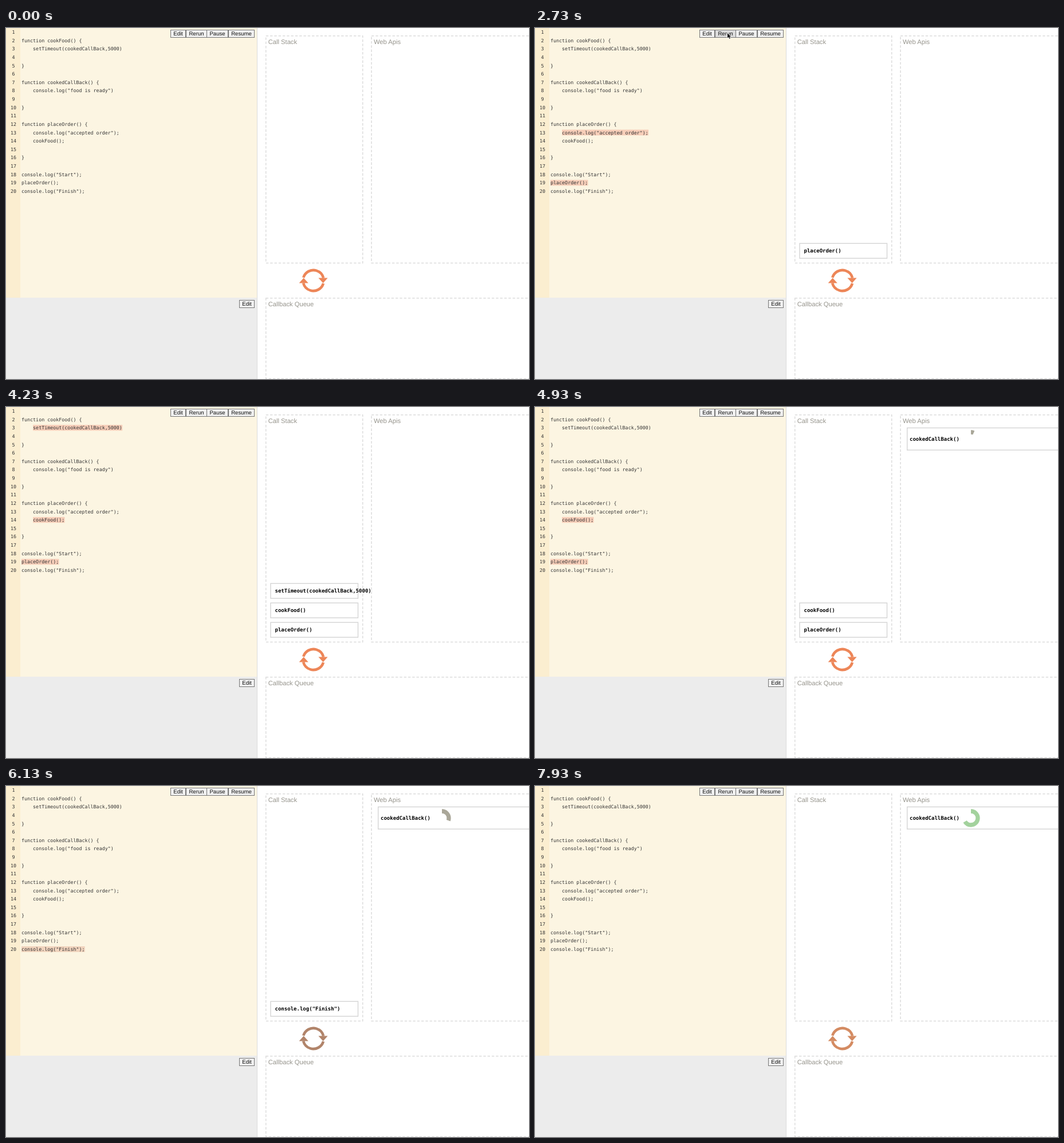
An HTML page with a canvas for the animation above (8000 ms loop, 913 by 613 pixels).

```html
<!DOCTYPE html>
<html lang="en">
<head>
<meta charset="utf-8">
<title>Event loop</title>
<style>
html, body { margin: 0; width: 100%; height: 100%; overflow: hidden; background: #fff; }
canvas { display: block; width: 913px; height: 613px; }
</style>
</head>
<body>
<canvas id="stage"></canvas>
<script>
const W = 913, H = 613, LOOP = 8000, FADE = 100;
const canvas = document.getElementById('stage');
const ctx = canvas.getContext('2d');
const dpr = window.devicePixelRatio || 1;
canvas.width = W * dpr;
canvas.height = H * dpr;

const MONO = '"DejaVu Sans Mono", monospace';
const SANS = '"Liberation Sans", Arial, sans-serif';
const CODE_FONT = `8.36px ${MONO}`;
const ITEM_FONT = `bold 9.03px ${MONO}`;
const CHAR = 5.033, LINE = 14.63;

const code = `
function cookFood() {
    setTimeout(cookedCallBack,5000)

}

function cookedCallBack() {
    console.log("food is ready")

}

function placeOrder() {
    console.log("accepted order");
    cookFood();

}

console.log("Start");
placeOrder();
console.log("Finish");`.split('\n');

// Each call highlights its line and occupies a stack slot
const calls = [
  { text: 'console.log("Start")', line: 18, slot: 0, on: 1830, off: 2330 },
  { text: 'placeOrder()', line: 19, slot: 0, on: 2330, off: 5430 },
  { text: 'console.log("accepted order")', line: 13, slot: 1, on: 2730, off: 3230 },
  { text: 'cookFood()', line: 14, slot: 1, on: 3630, off: 5030 },
  { text: 'setTimeout(cookedCallBack,5000)', line: 3, slot: 2, on: 4130, off: 4530 },
  { text: 'console.log("Finish")', line: 20, slot: 0, on: 5930, off: 6330 }
];
const TIMER = { on: 4530, start: 4600, length: 5000 };

const tones = [
  { from: 0, icon: '#ed8658', mark: '#f6cdb8', ring: '#a9a799' },
  { from: 5430, icon: '#b1846a', mark: '#f0d3bd', ring: '#aaa799' },
  { from: 6330, icon: '#c58764', mark: '#f0d3bd', ring: '#a6bd9b' },
  { from: 7230, icon: '#d48b62', mark: '#f6cdb8', ring: '#a3d29d' }
];

const clamp = v => Math.max(0, Math.min(1, v));
const mix = (a, b, k) => a + (b - a) * k;

function rect(x, y, w, h, color) {
  ctx.fillStyle = color;
  ctx.fillRect(x, y, w, h);
}

function text(str, x, y, font, color, align = 'left') {
  ctx.font = font;
  ctx.fillStyle = color;
  ctx.textAlign = align;
  ctx.fillText(str, x, y);
}

function frame(x, y, w, h, color, width) {
  ctx.strokeStyle = color;
  ctx.lineWidth = width;
  ctx.strokeRect(x, y, w, h);
}

function button(label, x, y, w, fill = '#f0f0f0') {
  rect(x, y, w, 14, fill);
  frame(x + .5, y + .5, w - 1, 13, '#777', 1);
  text(label, x + w / 2, y + 10.4, `9.6px ${SANS}`, '#111', 'center');
}

function panel(label, x, y, w, h) {
  ctx.setLineDash([4.4, 2.9]);
  frame(x, y, w, h, '#dcdcdc', 1.5);
  ctx.setLineDash([]);
  text(label, x + 4, y + 14.6, `11.2px ${SANS}`, '#96948c');
}

function drawEditor(t, tone) {
  rect(0, 0, 438, 471, '#fcf5e2');
  rect(0, 0, 25, 471, '#fbeed0');
  rect(0, 471, 438, 142, '#ececec');
  rect(438, 0, 1, H, '#dcdcdc');
  for (const c of calls) {
    if (t < c.on || t >= c.off) continue;
    const src = code[c.line - 1], body = src.trim();
    const x = 27 + (src.length - body.length) * CHAR;
    rect(x, (c.line - 1) * LINE + 2, body.length * CHAR, 10, tone.mark);
  }
  code.forEach((src, i) => {
    const y = 10 + i * LINE;
    text(i + 1, 13, y, CODE_FONT, '#333', 'center');
    text(src, 27, y, CODE_FONT, '#333');
  });
  const pressed = t >= 1430 && t < 3630;
  button('Edit', 287, 3, 27);
  button('Rerun', 314, 3, 37, pressed ? '#dcdcdc' : undefined);
  button('Pause', 350, 3, 38);
  button('Resume', 388, 3, 46);
  button('Edit', 407, 475, 27);
}

function drawStack(t) {
  for (const c of calls) {
    const alpha = Math.min(clamp((t - c.on) / FADE), clamp(1 - (t - c.off) / FADE));
    if (!alpha) continue;
    const y = 376.2 - c.slot * 34;
    ctx.globalAlpha = alpha;
    frame(462, y, 152.5, 26, '#d4d4d4', 1.4);
    text(c.text, 469.5, y + 16, ITEM_FONT, '#000');
    ctx.globalAlpha = 1;
  }
}

function drawTimer(t, tone) {
  if (t < TIMER.on) return;
  ctx.globalAlpha = clamp((t - TIMER.on) / FADE);
  frame(649.7, 36.5, 300, 38.7, '#d4d4d4', 1.4);
  text('cookedCallBack()', 654, 58.6, ITEM_FONT, '#000');
  const part = clamp((t - TIMER.start) / TIMER.length);
  ctx.beginPath();
  ctx.arc(761, 56, 12, -Math.PI / 2, -Math.PI / 2 + part * Math.PI * 2);
  ctx.strokeStyle = tone.ring;
  ctx.lineWidth = 7.3;
  ctx.stroke();
  ctx.globalAlpha = 1;
}

function drawLoopIcon(color) {
  ctx.save();
  ctx.translate(536.6, 441);
  ctx.strokeStyle = ctx.fillStyle = color;
  ctx.lineWidth = 4.6;
  for (let i = 0; i < 2; i++) {
    ctx.beginPath();
    ctx.arc(0, 0, 18.1, Math.PI * 1.09, Math.PI * 1.92);
    ctx.stroke();
    ctx.beginPath();
    ctx.moveTo(8.8, -4.4);
    ctx.lineTo(25, -4.4);
    ctx.lineTo(17, 4.4);
    ctx.fill();
    ctx.rotate(Math.PI);
  }
  ctx.restore();
}

function drawCursor(t) {
  if (t < 610 || t >= 4230) return;
  const enter = 1 - (1 - clamp((t - 610) / 600)) ** 2;
  const leave = clamp((t - 3530) / 300);
  const x = mix(mix(805, 336, enter), 902, leave);
  const y = mix(mix(300, 9, enter), 547, leave);
  ctx.save();
  ctx.translate(x, y);
  ctx.beginPath();
  [[0, 0], [0, 8.6], [2, 6.8], [3.3, 9.8], [4.8, 9.2], [3.5, 6.3], [6.2, 6.2]]
    .forEach(p => ctx.lineTo(...p));
  ctx.closePath();
  ctx.strokeStyle = '#fff';
  ctx.lineWidth = 1.2;
  ctx.stroke();
  ctx.fillStyle = '#111';
  ctx.fill();
  ctx.restore();
}

function draw(t) {
  const tone = tones.filter(p => t >= p.from).pop();
  ctx.setTransform(dpr, 0, 0, dpr, 0, 0);
  ctx.textRendering = 'geometricPrecision';
  rect(0, 0, W, H, '#fff');
  drawEditor(t, tone);
  panel('Call Stack', 453.7, 13.8, 169, 396.6);
  panel('Web Apis', 638, 13.8, 300, 396.6);
  panel('Callback Queue', 453.7, 471.7, 500, 140.8);
  drawStack(t);
  drawTimer(t, tone);
  drawLoopIcon(tone.icon);
  drawCursor(t);
}

function tick(now) {
  const t = now % LOOP;
  draw(Math.max(0, Math.floor((t - 30) / 100) * 100 + 30));
  requestAnimationFrame(tick);
}
requestAnimationFrame(tick);
</script>
</body>
</html>
```
